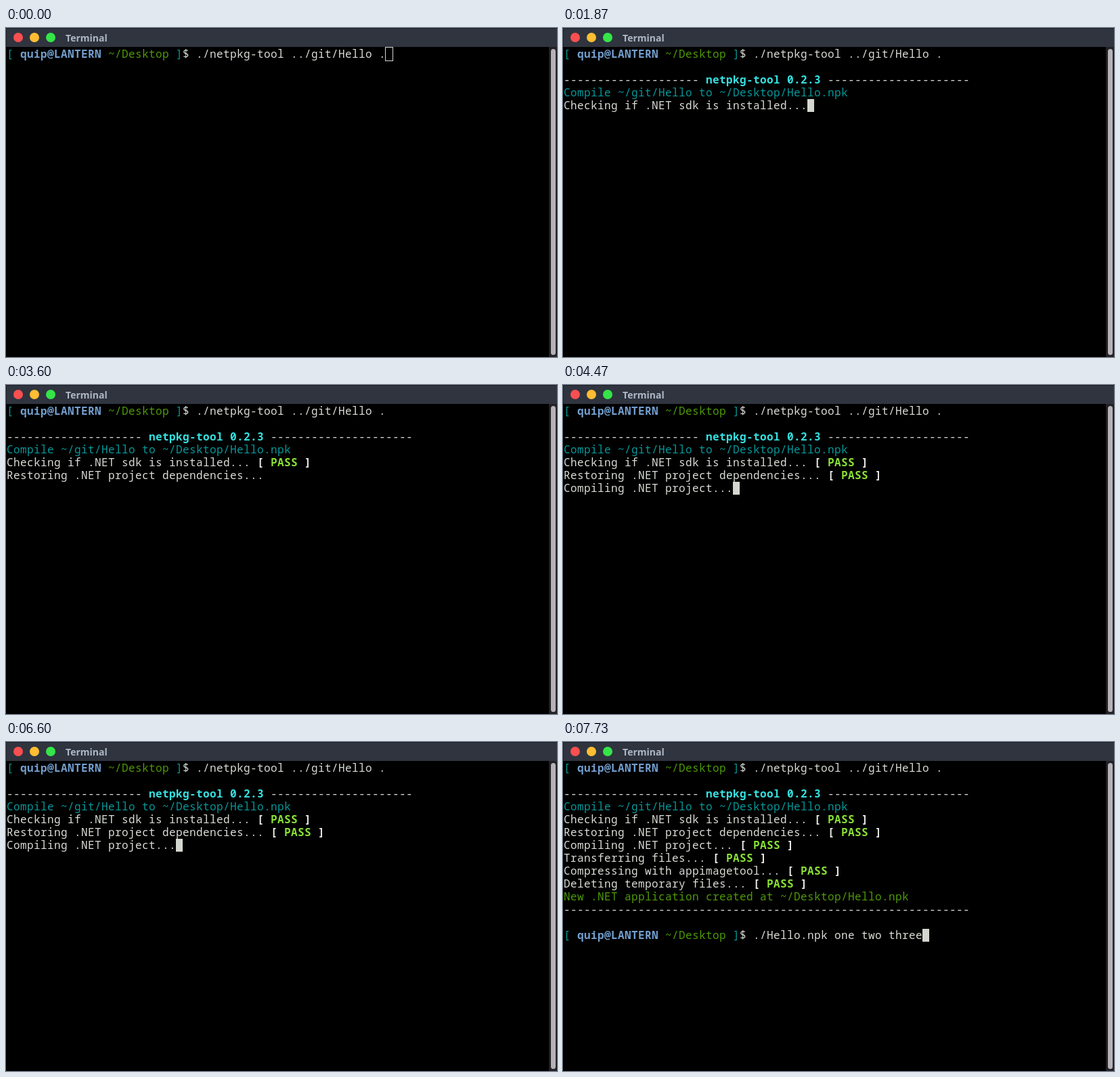
Recreate the animation shown at these times as an HTML page. Size 814x486 px, loop 8000 ms.

```html
<!DOCTYPE html>
<html lang="en">
<head>
<meta charset="utf-8">
<title>Terminal</title>
<style>
  html, body { margin: 0; width: 100%; height: 100%; overflow: hidden; background: #000; }
  #window { position: relative; width: 814px; height: 486px; overflow: hidden; background: #000; }
  #bar { position: absolute; inset: 0 0 auto; height: 28px; box-sizing: border-box; background: #2f343f; border: solid #1b1e25; border-width: 1px 0 0 1px; }
  #bar i { position: absolute; top: 6px; width: 14px; height: 14px; border-radius: 50%; }
  #bar b { position: absolute; left: 87px; top: 4px; font: bold 14px/20px "Noto Sans", sans-serif; color: #afb8c6; }
  #track { position: absolute; left: 802px; top: 28px; width: 12px; height: 458px; background: #222226; }
  #track i { position: absolute; left: 3px; top: 3px; width: 7px; height: 452px; border-radius: 4px; background: #b6b2b6; }
  #screen { position: absolute; left: 1px; top: 29px; margin: 0; color: #d9dcd5;
            font: 16px/19px "Noto Sans Mono", monospace; letter-spacing: .4px; font-variant-ligatures: none; }
  #screen div { height: 19px; white-space: pre; }
  #cursor { position: absolute; width: 10px; height: 19px; background: #d3d7cf; }
  #cursor.hollow { margin: -1px; width: 12px; height: 21px; box-sizing: border-box; background: none; border: 1px solid #d3d7cf; }
  .teal { color: #06989a; }
  .green { color: #4e9a06; }
  .user { color: #729fcf; }
  .cyan { color: #34e2e2; }
  .pass { color: #8ae234; }
  .white { color: #eeeeec; }
</style>
</head>
<body>
<div id="window">
  <div id="bar">
    <i style="left:10px;background:#f94f50"></i>
    <i style="left:34px;background:#fdbe33"></i>
    <i style="left:58px;background:#35e548"></i>
    <b>Terminal</b>
  </div>
  <div id="screen"></div>
  <div id="cursor"></div>
  <div id="track"><i></i></div>
</div>
<script>
const LOOP = 8000;
const screen = document.getElementById('screen');
const cursor = document.getElementById('cursor');

const span = (cls, text) => `<span class="${cls}">${text}</span>`;
const bold = (cls, text) => `<b class="${cls}">${text}</b>`;
const prompt = span('teal', '[ ') + bold('user', 'quip@LANTERN') +
  span('green', ' ~/Desktop ') + span('teal', ']') + '$ ';
const pass = ' ' + bold('white', '[ ') + bold('pass', 'PASS') + bold('white', ' ]');

const command = prompt + './netpkg-tool ../git/Hello .';
const header = [
  command, '',
  '-'.repeat(20) + bold('cyan', ' netpkg-tool 0.2.3 ') + '-'.repeat(21),
  span('teal', 'Compile ~/git/Hello to ~/Desktop/Hello.npk'),
];
const tasks = [
  'Checking if .NET sdk is installed...',
  'Restoring .NET project dependencies...',
  'Compiling .NET project...',
  'Transferring files...',
  'Compressing with appimagetool...',
  'Deleting temporary files...',
];

// All tasks before the given one have passed; that one is still running.
const running = n => [...header, ...tasks.slice(0, n).map(t => t + pass), tasks[n]];
const finished = input => [
  ...header, ...tasks.map(t => t + pass),
  span('green', 'New .NET application created at ~/Desktop/Hello.npk'),
  '-'.repeat(60), '', prompt + input,
];

// [start time, lines on screen]
const scenes = [
  [0, [command]],
  [1870, running(0)],
  [2600, running(1)],
  [4470, running(2)],
  [6870, running(4)],
  [6930, finished('')],
  [7730, finished('./Hello.npk one two three')],
];
// The cursor is hidden during these spans.
const hidden = [[800, 1400], [2400, 3000], [3600, 4200], [4800, 5400], [6000, 6600], [7200, 7470]];

let shown;
function draw(now) {
  const t = now % LOOP;
  const scene = scenes.findLast(([start]) => t >= start);
  if (scene !== shown) {
    shown = scene;
    const lines = scene[1];
    screen.innerHTML = lines.map(line => `<div>${line}</div>`).join('');
    cursor.style.left = 1 + 10 * screen.lastChild.textContent.length + 'px';
    cursor.style.top = 29 + 19 * (lines.length - 1) + 'px';
  }
  cursor.className = t < 200 ? 'hollow' : '';
  cursor.hidden = hidden.some(([from, to]) => t >= from && t < to);
  requestAnimationFrame(draw);
}
draw(performance.now());
</script>
</body>
</html>
```
